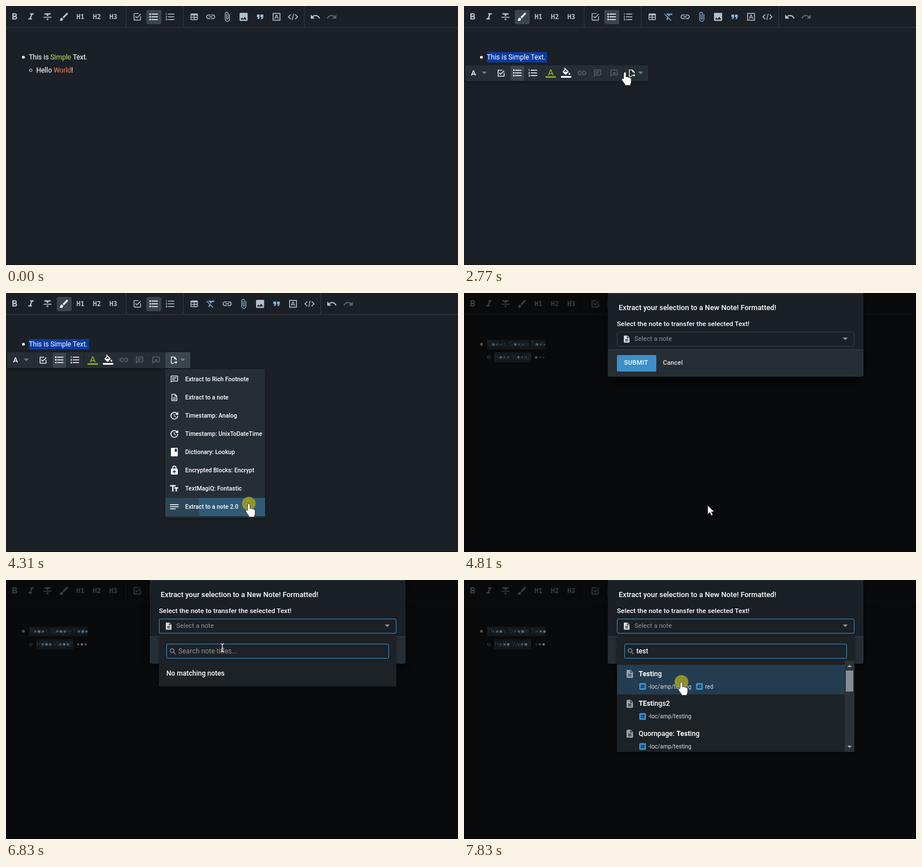
An HTML page for the animation above (8 s loop, 792 px wide and 455 px high).

```html
<!DOCTYPE html>
<html lang="en">
<head>
<meta charset="utf-8">
<title>Extract to a note</title>
<style>
html, body { margin: 0; width: 100%; height: 100%; overflow: hidden; background: #1a2026; }
svg { display: block; width: 792px; height: 455px; }
text { font-family: Roboto, Arial, sans-serif; white-space: pre; }
.mono { font-family: "Noto Sans Mono", monospace; }
.b { font-weight: 700; }
</style>
</head>
<body>
<svg id="stage" viewBox="0 0 792 455" xmlns="http://www.w3.org/2000/svg">
  <defs>
    <filter id="shade" x="-20%" y="-20%" width="140%" height="150%">
      <feDropShadow dx="0" dy="2" stdDeviation="2" flood-color="#000" flood-opacity=".35"/>
    </filter>
    <filter id="deep" x="-20%" y="-20%" width="140%" height="170%">
      <feDropShadow dx="0" dy="14" stdDeviation="14" flood-color="#000" flood-opacity=".4"/>
    </filter>
    <clipPath id="lastRow"><rect x="279" y="360" width="175" height="32"/></clipPath>
  </defs>
</svg>
<script>
const bubble = 'M20 2H4c-1.1 0-2 .9-2 2v18l4-4h14c1.1 0 2-.9 2-2V4c0-1.1-.9-2-2-2zm0 14H5.17L4 17.17V4h16v12z';
const ICONS = {
  bold: 'M15.6 10.79c.97-.67 1.65-1.77 1.65-2.79 0-2.26-1.75-4-4-4H7v14h7.04c2.09 0 3.71-1.7 3.71-3.79 0-1.52-.86-2.82-2.15-3.42zM10 6.5h3c.83 0 1.5.67 1.5 1.5s-.67 1.5-1.5 1.5h-3v-3zm3.5 9H10v-3h3.5c.83 0 1.5.67 1.5 1.5s-.67 1.5-1.5 1.5z',
  italic: 'M10 4v3h2.21l-3.42 8H6v3h8v-3h-2.21l3.42-8H18V4z',
  strike: 'M10 19h4v-3h-4v3zM5 4v3h5v3h4V7h5V4H5zM3 14h18v-2H3v2z',
  brush: 'M7 14c-1.66 0-3 1.34-3 3 0 1.31-1.16 2-2 2 .92 1.22 2.49 2 4 2 2.21 0 4-1.79 4-4 0-1.66-1.34-3-3-3zm13.71-9.37l-1.34-1.34c-.39-.39-1.02-.39-1.41 0L9 12.25 11.75 15l8.96-8.96c.39-.39.39-1.02 0-1.41z',
  check: 'M19 19H5V5h10V3H5c-1.1 0-2 .9-2 2v14c0 1.1.9 2 2 2h14c1.1 0 2-.9 2-2v-8h-2v8zM7.91 10.08L6.5 11.5 11 16 21 6l-1.41-1.42L11 13.17l-3.09-3.09z',
  list: 'M2.5 4.5h3v3h-3zM2.5 10.5h3v3h-3zM2.5 16.5h3v3h-3zM7 19h14v-2H7v2zm0-6h14v-2H7v2zm0-8v2h14V5H7z',
  numbers: 'M2 17h2v.5H3v1h1v.5H2v1h3v-4H2v1zm1-9h1V4H2v1h1v3zm-1 3h1.8L2 13.1v.9h3v-1H3.2L5 10.9V10H2v1zm5-6v2h14V5H7zm0 14h14v-2H7v2zm0-6h14v-2H7v2z',
  table: 'M5 4h14a2 2 0 0 1 2 2v12a2 2 0 0 1-2 2H5a2 2 0 0 1-2-2V6a2 2 0 0 1 2-2zM5 8.5V12h6V8.5zM13 8.5V12h6V8.5zM5 14v4h6v-4zM13 14v4h6v-4z',
  clear: 'M3.27 5L2 6.27l6.97 6.97L6.5 19h3l1.57-3.66L16.73 21 18 19.73 3.55 5.27 3.27 5zM6 5v.18L8.82 8h2.4l-.72 1.68 2.1 2.1L14.21 8H20V5H6z',
  link: 'M3.9 12c0-1.71 1.39-3.1 3.1-3.1h4V7H7c-2.76 0-5 2.24-5 5s2.24 5 5 5h4v-1.9H7c-1.71 0-3.1-1.39-3.1-3.1zM8 13h8v-2H8v2zm9-6h-4v1.9h4c1.71 0 3.1 1.39 3.1 3.1s-1.39 3.1-3.1 3.1h-4V17h4c2.76 0 5-2.24 5-5s-2.24-5-5-5z',
  attach: 'M16.5 6v11.5c0 2.21-1.79 4-4 4s-4-1.79-4-4V5c0-1.38 1.12-2.5 2.5-2.5s2.5 1.12 2.5 2.5v10.5c0 .55-.45 1-1 1s-1-.45-1-1V6H10v9.5c0 1.38 1.12 2.5 2.5 2.5s2.5-1.12 2.5-2.5V5c0-2.21-1.79-4-4-4S7 2.79 7 5v12.5c0 3.04 2.46 5.5 5.5 5.5s5.5-2.46 5.5-5.5V6h-1.5z',
  image: 'M21 19V5c0-1.1-.9-2-2-2H5c-1.1 0-2 .9-2 2v14c0 1.1.9 2 2 2h14c1.1 0 2-.9 2-2zM8.5 13.5l2.5 3.01L14.5 12l4.5 6H5l3.5-4.5z',
  quote: 'M6 17h3l2-4V7H5v6h3zm8 0h3l2-4V7h-6v6h3z',
  font: 'M3 3h18v18H3zM5 5v14h14V5zM9.6 14.3h4.8l.8 2.4h1.9L13 6.5h-2L6.9 16.7h1.9zM12 8.6l1.7 4.2h-3.4z',
  code: 'M8 16.6L3.4 12 8 7.4 6.6 6l-6 6 6 6 1.4-1.4zm8 0l4.6-4.6L16 7.4 17.4 6l6 6-6 6-1.4-1.4zM12.6 5h1.7l-3 14H9.6z',
  undo: 'M12.5 8c-2.65 0-5.05.99-6.9 2.6L2 7v9h9l-3.62-3.62c1.39-1.16 3.16-1.88 5.12-1.88 3.54 0 6.55 2.31 7.6 5.5l2.37-.78C21.08 11.03 17.15 8 12.5 8z',
  redo: 'M18.4 10.6C16.55 8.99 14.15 8 11.5 8c-4.65 0-8.58 3.03-9.96 7.22L3.9 16c1.05-3.19 4.05-5.5 7.6-5.5 1.95 0 3.73.72 5.12 1.88L13 16h9V7l-3.6 3.6z',
  letter: 'M11 3L5.5 17h2.25l1.12-3h6.25l1.12 3h2.25L13 3h-2zm-1.38 9L12 5.67 14.38 12H9.62z',
  fill: 'M16.56 8.94L7.62 0 6.21 1.41l2.38 2.38-5.15 5.15c-.59.59-.59 1.54 0 2.12l5.5 5.5c.29.29.68.44 1.06.44s.77-.15 1.06-.44l5.5-5.5c.59-.58.59-1.53 0-2.12zM5.21 10L10 5.21 14.79 10H5.21zM19 11.5s-2 2.17-2 3.5c0 1.1.9 2 2 2s2-.9 2-2c0-1.33-2-3.5-2-3.5z',
  comment: bubble + 'M6 11h8v2H6zM6 7h12v2H6z',
  photo: bubble + 'M9.5 9.5l1.5 2 2.5-3.5 3.5 5.5H7z',
  extract: 'M14 2H6c-1.1 0-2 .9-2 2v16c0 1.1.9 2 2 2h6v-2H6V4h7v5h5v3h2V8zM17 14v3h-5v2h5v3l5-4z',
  note: 'M8 16h8v2H8zm0-4h8v2H8zm6-10H6c-1.1 0-2 .9-2 2v16c0 1.1.89 2 1.99 2H18c1.1 0 2-.9 2-2V8l-6-6zm4 18H6V4h7v5h5v11z',
  file: 'M14 2H6c-1.1 0-1.99.9-1.99 2L4 20c0 1.1.89 2 1.99 2H18c1.1 0 2-.9 2-2V8l-6-6zm2 16H8v-2h8v2zm0-4H8v-2h8v2zm-3-5V3.5L18.5 9H13z',
  clock: 'M21 10.12h-6.78l2.74-2.82c-2.73-2.7-7.15-2.8-9.88-.1-2.73 2.71-2.73 7.08 0 9.79s7.15 2.71 9.88 0C18.32 15.65 19 14.08 19 12.1h2c0 1.98-.88 4.55-2.64 6.29-3.51 3.48-9.21 3.48-12.72 0-3.5-3.47-3.53-9.11-.02-12.58s9.14-3.47 12.65 0L21 3v7.12zM12.5 8v4.25l3.5 2.08-.72 1.21L11 13V8h1.5z',
  book: 'M18 2H6c-1.1 0-2 .9-2 2v16c0 1.1.9 2 2 2h12c1.1 0 2-.9 2-2V4c0-1.1-.9-2-2-2zM13 4h5v8l-2.5-1.5L13 12V4z',
  lock: 'M18 8h-1V6c0-2.76-2.24-5-5-5S7 3.24 7 6v2H6c-1.1 0-2 .9-2 2v10c0 1.1.9 2 2 2h12c1.1 0 2-.9 2-2V10c0-1.1-.9-2-2-2zM8.9 6c0-1.71 1.39-3.1 3.1-3.1s3.1 1.39 3.1 3.1v2H8.9V6zM16 16h-3v3h-2v-3H8v-2h3v-3h2v3h3v2z',
  size: 'M2 4v3h5v12h3V7h5V4H2zm19 5h-9v3h3v7h3v-7h3V9z',
  lines: 'M2 18h13v-2H2v2zM2 6v2h20V6H2zm0 7h20v-2H2v2z',
  search: 'M15.5 14h-.79l-.28-.27C15.41 12.59 16 11.11 16 9.5 16 5.91 13.09 3 9.5 3S3 5.91 3 9.5 5.91 16 9.5 16c1.61 0 3.09-.59 4.23-1.57l.27.28v.79l5 4.99L20.49 19l-4.99-5zm-6 0C7.01 14 5 11.99 5 9.5S7.01 5 9.5 5 14 7.01 14 9.5 11.99 14 9.5 14z'
};

const BG = '#1a2026', PANEL = '#282e34', ON = '#3b454d', GREY = '#b3c1cc', DIM = '#5d666e', BLUE = '#3d8fc9';

const rect = (x, y, w, h, fill, more = '') =>
  `<rect x="${x}" y="${y}" width="${w}" height="${h}" fill="${fill}" ${more}/>`;
const frame = (x, y, w, h, stroke) =>
  rect(x + .5, y + .5, w - 1, h - 1, 'none', `rx="2" stroke="${stroke}"`);
const text = (x, y, s, size = 12, fill = '#fff', weight = 400, more = '') =>
  `<text x="${x}" y="${y}" font-size="${size}" fill="${fill}" font-weight="${weight}" ${more}>${s}</text>`;
const icon = (name, x, y, size = 19, fill = GREY) =>
  `<path transform="translate(${x - size / 2} ${y - size / 2}) scale(${size / 24})" fill="${fill}" fill-rule="${name === 'table' || name === 'font' ? 'evenodd' : 'nonzero'}" d="${ICONS[name]}"/>`;
const caret = (x, y, fill = '#747d85', w = 4.5) =>
  `<path d="M${x - w} ${y - w / 2}h${2 * w}l${-w} ${w}z" fill="${fill}"/>`;

const stage = document.getElementById('stage');
function layer(html, more = '') {
  stage.insertAdjacentHTML('beforeend', `<g ${more}>${html}</g>`);
  return stage.lastElementChild;
}
const show = (el, on) => el.style.display = on ? '' : 'none';

// Numbers in the list are gaps before a separator
function toolbar(wide, listOn) {
  const names = ['bold', 'italic', 'strike', 'brush', 'H1', 'H2', 'H3', 22, 'check', 'list', 'numbers', 22,
    'table', ...(wide ? ['clear'] : []), 'link', 'attach', 'image', 'quote', 'font', 'code', 19, 'undo', 'redo'];
  const blues = wide ? { clear: '#6fa9de', attach: '#86b2de', quote: '#86b2de' } : { quote: '#a3c0dc' };
  const sizes = { check: 17, table: 17, font: 18 };
  const pitch = 28.85;
  let x = 15, out = rect(0, 37, 792, 1, '#30373e');
  for (const n of names) {
    if (n > 0) {
      x += n - pitch;
      out += rect(Math.round(x), 0, 1, 37, '#30373e');
      x += 20;
      continue;
    }
    const on = (n === 'list' && listOn) || (n === 'brush' && wide);
    if (on) out += rect(Math.round(x - 13), 7, 26, 25, ON, 'rx="3"');
    out += n[0] === 'H'
      ? text(x, 23, n, 11.5, GREY, 600, 'class="mono" text-anchor="middle"')
      : icon(n, x, 19, sizes[n] || 19, on ? '#fff' : n === 'redo' ? DIM : blues[n] || GREY);
    x += pitch;
  }
  return out;
}

const bullets = '<circle cx="30.500" cy="90" r="2.500" fill="#fff"/><circle cx="43.500" cy="113" r="2.300" fill="none" stroke="#ddd"/>';
const span = (s, fill) => `<tspan fill="${fill}">${s}</tspan>`;

// Editor
layer(rect(0, 0, 792, 455, BG) + rect(0, 454, 792, 1, '#12161a'));
const barIdle = layer(toolbar(false, true));
const barWide = layer(toolbar(true, true));
const barOff = layer(toolbar(false, false));
const soft = 'stroke="#fff" stroke-width=".15"';
layer(bullets);
const lineOne = layer(text(40, 94, `This is ${span('Simple', '#a2bd2c')} Text.`, 11.95, '#fff', 400, soft));
const lineTwo = layer(text(53, 117, `Hello ${span('World', '#dd5630')}!`, 11.95, '#fff', 400, soft));
const chosen = layer(rect(40, 81, 106, 18, '#0a3ba2') + text(40, 94, 'This is Simple Text.', 11.95));
const chosenBox = chosen.firstElementChild;
const fold = layer('<path d="M7.500 87.500h9l-4.500 6.500z" fill="#b9d8e8"/>');

// Floating format bar
const seps = [49, 136, 279].map(x => rect(x, 104, 1, 28, '#20262b')).join('');
const popup = layer(
  rect(2, 104, 321, 28, PANEL, 'rx="2" filter="url(#shade)"') +
  rect(82, 105, 23, 26, ON, 'rx="2"') + seps +
  text(16.5, 122, 'A', 13, '#fff', 500, 'text-anchor="middle"') + caret(35.5, 117.5) +
  icon('check', 65, 118, 16, '#fff') + icon('list', 93.5, 117.5, 19, '#fff') + icon('numbers', 121, 117.5, 19, '#fff') +
  icon('letter', 152, 118, 18, '#95b52b') + rect(143, 123.5, 18, 2.5, '#95b52b') +
  icon('fill', 179.5, 117, 18, '#fff') + rect(170, 123, 18, 3, '#fff') +
  icon('link', 206.5, 117.5, 18, DIM) + icon('comment', 234, 118, 15, DIM) + icon('photo', 263, 118, 15, DIM));
const extractOn = layer(rect(279, 104, 44, 28, ON, 'rx="2"'));
const extract = layer(icon('extract', 294, 118, 15, '#fff') + caret(309.5, 117.5));

// Drop-down of actions
const ACTIONS = [['comment', 'Extract to Rich Footnote'], ['note', 'Extract to a note'], ['clock', 'Timestamp: Analog'],
  ['clock', 'Timestamp: UnixToDateTime'], ['book', 'Dictionary: Lookup'], ['lock', 'Encrypted Blocks: Encrypt'],
  ['size', 'TextMagiQ: Fontastic'], ['lines', 'Extract to a note 2.0']];
const menu = layer(
  rect(279, 134, 175, 261, PANEL, 'filter="url(#shade)"') +
  rect(279, 0, 175, 32, '#2b4659', 'id="hover"') +
  '<circle id="ripple" cx="425" cy="371" r="88" fill="#2f5a78" clip-path="url(#lastRow)"/>' +
  ACTIONS.map(([pic, label], i) =>
    icon(pic, 295, 151.5 + 32 * i, pic === 'comment' || pic === 'note' ? 15 : 18, '#fff') +
    text(314, 155.3 + 32 * i, label, 10.4, '#fff', 500)).join(''));
const hover = document.getElementById('hover'), ripple = document.getElementById('ripple');

// Dimmed page and dialog
const veil = layer(
  rect(0, 0, 792, 455, '#000', 'opacity=".68"') +
  rect(40, 82, 103, 17, '#11171b') + rect(53, 104, 65, 18, '#11171b') +
  text(40, 94, 'This is Simple Text.', 11.95, '#2a3136') + text(53, 117, 'Hello World!', 11.95, '#2a3136'));
let dotHtml = '';
for (const [x, y, gap] of [[51.5, 90.5, 38.3], [64.5, 113, 31]])
  for (let i = 0; i < 9; i++)
    dotHtml += `<circle cx="${x + Math.floor(i / 3) * gap + (i % 3) * 6.5}" cy="${y}" fill="#657886"/>`;
const dots = layer(dotHtml);

const dialog = layer(
  rect(252, -6, 448, 153, PANEL, 'rx="3" filter="url(#deep)"') +
  rect(252, 0, 448, 99, BG) + rect(252, 0, 448, 1, '#2b3b48') + rect(252, 99, 448, 1, '#394149') +
  text(271, 30, 'Extract your selection to a New Note! Formatted!', 12.75, '#fff', 500) +
  text(268, 58, 'Select the note to transfer the selected Text!', 11.75, '#fff', 500) +
  frame(268, 68, 416, 26, '#363e46') +
  icon('file', 285, 81, 15, '#d5dce1') + text(298.5, 84, 'Select a note', 11.4, '#8b959d') + caret(668, 80.5, '#8b959d') +
  rect(268, 109, 69, 29, BLUE, 'rx="2"') +
  text(280.5, 126, 'SUBMIT', 11, '#fff', 500, 'letter-spacing=".4"') +
  text(348.5, 126, 'Cancel', 11, '#dfe6eb', 500, 'letter-spacing=".2"'));

const finder = layer(
  rect(268, 94, 416, 93, BG, 'filter="url(#shade)"') + frame(268, 68, 416, 26, BLUE) +
  text(281, 168, 'No matching notes', 12, '#fff', 500));

const tag = (x, y, s) =>
  rect(x, y - 9.5, 12, 12, BLUE, 'rx="2"') +
  `<path d="M${x + 4.7} ${y - 7}l-.8 7M${x + 8} ${y - 7}l-.8 7M${x + 2.5} ${y - 5}h7.500M${x + 2} ${y - 2}h7.500" stroke="#10202c" fill="none"/>` +
  text(x + 16, y, s, 10.1, '#d3dbe1');
const NOTES = ['<tspan class="b">Test</tspan>ing', '<tspan class="b">TEst</tspan>ings2',
  'Quornpage: <tspan class="b">Test</tspan>ing'];
const results = layer(
  rect(268, 99, 416, 203, BG, 'filter="url(#shade)"') +
  rect(268, 149, 399, 52, '#243c4f') +
  NOTES.map((s, i) => icon('file', 290.5, 165 + 52.5 * i, 17, '#98a3ac') +
    text(306, 169 + 52.4 * i, s, 12.15, '#fff', 500) + tag(307, 190.5 + 52.8 * i, '-loc/amp/testing')).join('') +
  tag(406.5, 190.5, 'red') +
  rect(667, 142, 17, 160, '#2b323a') + rect(669, 159, 13, 37, '#868c93') +
  '<path d="M671.500 153l4-4 4 4zM671.500 291l4 4 4-4z" fill="#a5adb4"/>');

const field = layer(frame(281, 112, 390, 26, BLUE) + icon('search', 292.5, 125.5, 15, '#8b959d') +
  text(302, 129, '', 12.1));
const query = field.lastElementChild;

// Pointer
const press = layer('<circle r="12" fill="#a29e22" opacity=".87"/>');
const pointers = {
  beam: layer('<path d="M-3-7q3 0 3 2V5q0 2-3 2M3-7q-3 0-3 2V5q0 2 3 2M-1.500 1h3" fill="none" stroke="#fff" stroke-width="1.200"/>'),
  arrow: layer('<path d="M0 0V16l3.800-3.600 2.600 5.800 2.700-1.200-2.600-5.600H11.500z" fill="#fff" stroke="#111" stroke-width=".7"/>'),
  hand: layer('<path d="M-2 2a2 2 0 0 1 4 0v7l1-.5a2 2 0 0 1 3 1 2 2 0 0 1 3 1 1.800 1.800 0 0 1 2 2v5c0 2-1.500 3-1.500 6h-9c0-3-5-6.500-6-10.500a1.800 1.800 0 0 1 3-1z" fill="#fff" stroke="#222" stroke-width=".8"/>')
};

// Pointer moves: start time, x, y, shape, pressed
const MOVES = [
  [250, 300, 338, 'beam'], [500, 215, 210, 'beam'], [740, 160, 104, 'beam'], [990, 147, 90, 'beam'],
  [1260, 95, 88, 'beam', 1], [1510, 46, 87, 'beam', 1], [1760, 40, 88, 'beam', 1], [2010, 62, 97, 'beam'],
  [2260, 130, 108, 'arrow'], [2510, 215, 113, 'arrow'], [2770, 282, 116, 'hand'], [3020, 302, 117, 'hand'],
  [3300, 304, 117, 'hand', 1], [3550, 369, 296.5, 'hand'], [3800, 397, 330, 'hand'], [4060, 422, 366, 'hand'],
  [4310, 425.5, 370, 'hand', 1], [4560, 427, 373, 'arrow'], [5060, 434, 310, 'arrow'], [5310, 450, 170, 'arrow'],
  [5560, 458, 84, 'hand'], [5810, 458, 82, 'hand', 1], [6060, 445, 84, 'hand'], [6310, 400, 104, 'arrow'],
  [6580, 379, 119, 'beam'], [7580, 381, 174, 'hand'], [7830, 381, 179, 'hand', 1]
];
const HOVERS = [[3550, 2], [3800, 5], [4060, 7]];
const TYPED = [[7080, 'te'], [7330, 'test']];
const at = (list, t) => list.filter(e => e[0] <= t).pop();

function draw(t) {
  const selecting = t >= 1260 && t < 4560, modal = t >= 4560;
  show(barIdle, t < 1260);
  show(barWide, selecting);
  show(barOff, modal);
  show(lineOne, t < 1260);
  show(lineTwo, t < 1510);
  show(chosen, selecting);
  const left = t < 1510 ? 95 : t < 1760 ? 46 : 40;
  chosenBox.setAttribute('x', left);
  chosenBox.setAttribute('width', 145.5 - left);
  show(fold, t >= 1260 && t < 2770);

  const bar = t >= 1510 && !modal, open = t >= 3300 && !modal;
  show(popup, bar);
  show(extract, bar);
  show(extractOn, open);
  show(menu, open);
  const row = at(HOVERS, t);
  show(hover, row);
  if (row) hover.setAttribute('y', 136 + 32 * row[1]);
  show(ripple, t >= 4310);

  show(veil, modal);
  show(dots, modal);
  show(dialog, modal);
  [...dots.children].forEach((d, i) => {
    const wave = Math.sin(t / 200 + (i % 3 - 2) * 1.3);
    d.setAttribute('r', 1.9 + .4 * wave);
    d.setAttribute('opacity', .65 + .25 * wave);
  });

  const typed = at(TYPED, t), found = t >= 7330;
  show(finder, t >= 6060);
  show(results, found);
  show(field, t >= 6060);
  query.textContent = typed ? typed[1] : 'Search note titles...';
  query.setAttribute('fill', typed ? '#fff' : '#8b959d');
  query.setAttribute('font-weight', typed ? 500 : 400);

  const m = at(MOVES, t);
  for (const k in pointers) show(pointers[k], m && m[3] === k);
  show(press, m && m[4]);
  if (m) {
    pointers[m[3]].setAttribute('transform', `translate(${m[1]} ${m[2]})`);
    press.setAttribute('transform', `translate(${m[1] - (m[3] === 'beam' ? 2.5 : 0)} ${m[2]})`);
  }
}

// The screen refreshes only at these moments
const TICKS = [0, 250, 500, 740, 990, 1260, 1510, 1760, 2010, 2260, 2510, 2770, 3020, 3300, 3550, 3800,
  4060, 4310, 4560, 4810, 5060, 5310, 5560, 5810, 6060, 6310, 6580, 6830, 7080, 7330, 7580, 7830];
const start = performance.now();
let last = -1;
function tick() {
  const now = (performance.now() - start) % 8000;
  const t = TICKS.filter(v => v <= now).pop() || 0;
  if (t !== last) draw(last = t);
  requestAnimationFrame(tick);
}
tick();
</script>
</body>
</html>
```
